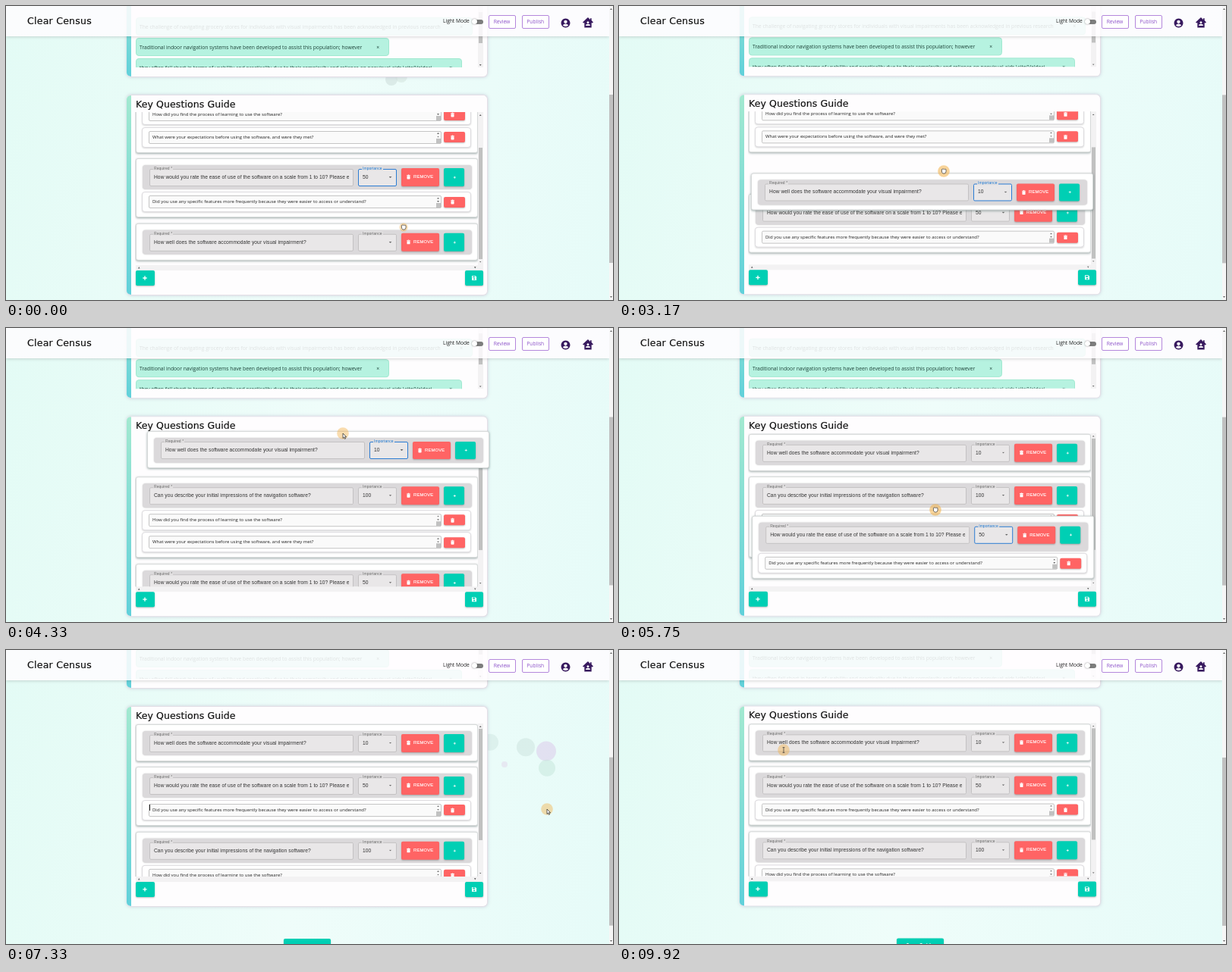
These frames come from a looping animation (800 px wide and 388 px high, 10000 ms). An HTML page:

```html
<!DOCTYPE html>
<html lang="en">
<head>
<meta charset="utf-8">
<title>Key Questions Guide</title>
<style>
html, body { margin: 0; width: 100%; height: 100%; overflow: hidden; }
#stage { position: relative; width: 800px; height: 388px; overflow: hidden;
  background: linear-gradient(100deg, #e3fbf5, #effdfa 50%, #e6fbf8);
  font: 6.67px/1 "Open Sans", "Noto Sans", sans-serif; color: #222; }
#stage div { position: absolute; box-sizing: border-box; white-space: pre; }
#stage svg { position: absolute; overflow: visible; }
.title { font: 12.5px/16px "DejaVu Sans", sans-serif; letter-spacing: .1px; color: #111; -webkit-text-stroke: .2px #111; }
.panel { background: #fefdfe; border: 1px solid #e3dee6; border-left: 0; border-radius: 6px; overflow: hidden;
  box-shadow: 0 0 4px rgba(150, 130, 170, .35); }
.stripe { background: linear-gradient(#a3e9d0, #5fd0da); }
.clip { overflow: hidden; }
.chip { background: #b6f2e0; border: 1px solid #a0e8d0; border-radius: 4px; font-size: 6.74px; line-height: 23.3px; padding-left: 4px; color: #1d4238; }
.chip i { position: absolute; right: 12px; font-style: normal; }
.card { background: #fff; border: 1px solid #d6d9d9; border-radius: 3px; box-shadow: 0 1px 3px rgba(60, 90, 85, .5); }
.row { background: #dbd9db; border-radius: 4px; box-shadow: 0 0 2px rgba(0, 0, 0, .2); }
.field { background: #e9e7e8; border: 1px solid #c4c2c3; border-radius: 2px; overflow: hidden;
  font: 6.67px/20px "Liberation Sans", Arial, sans-serif; letter-spacing: .0625px; color: #333; }
.field span { position: absolute; left: 5px; right: 5px; overflow: hidden; }
.label { background: #e2e0e1; padding: 0 1px; font: 5px/5px "Liberation Sans", Arial, sans-serif; letter-spacing: .05px; color: #666; }
.focus .select { border-color: #2b7cd3; }
.focus .imp { color: #1976d2; }
.red, .teal { border-radius: 2px; color: #fff; box-shadow: 0 1px 2px rgba(0, 0, 0, .25); }
.red { background: #ff6464; font: 500 5.83px/23px "Liberation Sans", Arial, sans-serif; letter-spacing: .17px; -webkit-text-stroke: .15px #fff; }
.teal { background: #00cfb4; text-align: center; }
.sub { background: #fff; border: 1px solid #dcdade; border-radius: 4px; box-shadow: 0 1px 2px rgba(0, 0, 0, .15); }
.area { background: #fafafa; border: 1px solid #c4c4c4; border-radius: 2px; padding-left: 4px; font-size: 6px; line-height: 15px; }
.up, .down { background: #666; }
.up { clip-path: polygon(50% 0, 100% 100%, 0 100%); }
.down { clip-path: polygon(0 0, 100% 0, 50% 100%); }
.track { background: #f3f2f3; }
.thumb { background: #c1c1c1; }
.head { background: rgba(255, 253, 255, .86); box-shadow: 0 1px 4px rgba(0, 0, 0, .16); }
.outline { border: 1px solid #b487dc; border-radius: 2px; color: #8b50c8; text-align: center; line-height: 16px; background: #fff; }
</style>
</head>
<body>
<div id="stage"></div>
<script>
const LOOP = 10000, SINGLE = 56.1, PAIR = 85.8, TRIPLE = 115, LIST_Y = 140.5, MAX_SCROLL = 54.6;
const LIFT_GAP = 5; // a lifted card keeps extra room above its follow-ups

const box = (cls, x, y, w, h, html = '', id = '') =>
  `<div class="${cls}" id="${id}" style="left:${x}px;top:${y}px;width:${w}px;height:${h}px">${html}</div>`;
const text = (cls, x, y, html) => `<div class="${cls}" style="left:${x}px;top:${y}px">${html}</div>`;
const icon = (x, y, size, body, fill = '#fff') =>
  `<svg style="left:${x}px;top:${y}px" width="${size}" height="${size}" viewBox="0 0 24 24" fill="${fill}">${body}</svg>`;

const TRASH = '<path d="M4 4h5l1-2h4l1 2h5v3H4zM5 8h14v12q0 2-2 2H7q-2 0-2-2z"/>';
const PLUS = '<path d="M10 4h4v6h6v4h-6v6h-4v-6H4v-4h6z"/>';
const SAVE = '<path fill-rule="evenodd" d="M3 3h14l4 4v14H3zM6 5v5h10V5zM12 13a3 3 0 1 0 .1 0z"/>';
const USER = '<path fill-rule="evenodd" d="M12 1a11 11 0 1 0 .1 0zM12 5a4 4 0 1 1-.1 0zM5 17q7-6 14 0-7 7-14 0z"/>';
const HOME = '<path fill-rule="evenodd" d="M12 0L0 11l2 2 2-1v11h16V12l2 1 2-2-4-4V2h-3v3zM12 9a2.5 2.5 0 1 1-.1 0zM7 19q0-4 5-4t5 4z"/>';

const subRow = (label, y) =>
  box('sub', 8, y, 434, 27) +
  box('area', 17, y + 5, 386, 17, label) +
  box('up', 397, y + 7.5, 3, 2) + box('down', 397, y + 12, 3, 2) +
  box('thumb', 395.5, y + 15, 6, 6) +
  box('red', 406, y + 6.5, 27.5, 14) + icon(413.5, y + 10, 7, TRASH);

const card = (id, q, value, subs, gap) => box('card', 0, 0, 451, 49 + 29.4 * subs.length + gap, '', id)
  .replace('</div>', `<div style="left:-1px;top:-1px">` +
    box('row', 9, 9, 433.5, 32.5 + gap) +
    box('field', 18, 14, 269, 23, `<span>${q}</span>`) + text('label', 23, 11, 'Required *') +
    box('field select', 293, 14, 50.5, 23, `<span class="val">${value}</span>`) + text('label imp', 298, 11, 'Importance') +
    box('down', 333.5, 24, 4, 2.2) +
    box('red', 350, 13.5, 50, 23.5, '<span style="margin-left:16px">REMOVE</span>') + icon(356, 21.5, 7, TRASH) +
    box('teal', 406, 13.5, 27, 23.5) + icon(417.5, 23, 4.5, PLUS) +
    subs.map((s, i) => subRow(s, 44.2 + gap + 29.4 * i)).join('') + '</div></div>');

const QUESTIONS = {
  first: ['Can you describe your initial impressions of the navigation software?', '100',
    ['How did you find the process of learning to use the software?',
     'What were your expectations before using the software, and were they met?']],
  rate: ['How would you rate the ease of use of the software on a scale from 1 to 10? Please explain', '50',
    ['Did you use any specific features more frequently because they were easier to access or understand?']],
  well: ['How well does the software accommodate your visual impairment?', '10', []]
};
const make = key => card(key, ...QUESTIONS[key], 0);
const makeLifted = key => card('up-' + key, ...QUESTIONS[key], QUESTIONS[key][2].length ? LIFT_GAP : 0);
const chip = (y, w, label) => box('chip', 0, y, w, 24.5, `${label}<i>×</i>`);

const upper = box('panel', 158.5, -60, 476.5, 153.7, box('stripe', 0, -1, 6.5, 155)) +
  box('clip', 171, -50, 451, 131,
    chip(64.5, 444, 'The challenge of navigating grocery stores for individuals with visual impairments has been acknowledged in previous research') +
    chip(91.7, 334, 'Traditional indoor navigation systems have been developed to assist this population; however') +
    chip(118.5, 430, 'they often fall short in terms of usability and practicality due to their complexity and reliance on nonvisual aids \\cite{Valdori')) +
  box('track', 622, -40, 6.5, 121) + box('thumb', 622.5, 8, 5.5, 40.5) + box('down', 623.7, 77, 3, 2);

const guide = box('panel', 158.5, 116.5, 476.5, 265.5, box('stripe', 0, -1, 6.5, 266)) +
  text('title', 171, 121.5, 'Key Questions Guide') +
  box('track', 622, 140, 6.5, 202) + box('up', 623.7, 143, 3, 2) + box('down', 623.7, 336.5, 3, 2) +
  box('thumb', 622.5, 147, 5.5, 147, '', 'thumb') +
  box('track', 171, 342, 457.5, 6.5) +
  box('up', 174, 344, 2.5, 2.5) + box('down', 617, 344, 2.5, 2.5) +
  box('clip', 170, 140, 452, 202, `<div id="list" style="left:1px">${make('first') + make('rate') + make('well')}</div>`) +
  box('teal', 171, 349.4, 24.5, 20) + icon(179.3, 355.4, 8, PLUS) +
  box('teal', 604.5, 349.4, 24.5, 20) + icon(613, 355.4, 8, SAVE) +
  box('teal', 365.5, 423.5, 62.5, 20, '<b style="line-height:20px">Save Guide</b>') +
  box('', 188.5, 247, .8, 7.5, '', 'caret');

const header = box('head', 0, 0, 795, 40) +
  `<div class="title" style="left:28px;top:11.5px;letter-spacing:.25px">Clear Census</div>` +
  text('', 576, 17.3, 'Light Mode') +
  box('', 616, 17.5, 13, 6, '', 'switch') + box('', 613.5, 16.7, 7.5, 7.5, '', 'knob') +
  box('outline', 635.5, 11.5, 36, 18, 'Review') + box('outline', 679.5, 11.5, 36.5, 18, 'Publish') +
  icon(730.5, 15.5, 13, USER, '#37195e') + icon(760, 15, 14, HOME, '#37195e');

const bar = box('', 794.5, 0, 5.5, 388, '', 'bar') + box('thumb', 795, 117, 5, 222, '', 'pageThumb') +
  box('up', 796, 3, 3, 2) + box('down', 796, 383, 3, 2);

const pointer = `<svg id="pointer" width="1" height="1">
  <circle id="halo" r="7.8" fill="#f3b145"/>
  <path id="hand" d="M-2.6-1v-1.4q1-1 1.6 0 .8-1.3 1.5 0 .8-1 1.5 0 .9-.6 1 .4V.6Q2.6 3 1 3h-2Q-3 2-2.6-1z" fill="#fff" stroke="#333" stroke-width=".7"/>
  <path id="arrow" d="M0 0v6.4l1.5-1.3 1 2.3 1.1-.5-1-2.2h2z" fill="#fff" stroke="#222" stroke-width=".7"/>
  <path id="beam" d="M-1.4-3.4h2.8M0-3.4v6.8M-1.4 3.4h2.8" stroke="#333" stroke-width=".7"/></svg>`;

// x, y, radius, colour, start, end
const BUBBLES = [
  [508, 97, 8, '#cfe0dc', -900, 900], [521, 93, 8, '#d6e6e0', -900, 900],
  [492, 98, 8, '#f3c4dc', 700, 2200], [486, 113, 6, '#d9ead9', 700, 2000],
  [638, 122, 11, '#d3e9e4', 6500, 8000], [657, 151, 4, '#e3dcec', 6550, 8100],
  [685, 128, 12, '#cfe6e0', 6600, 8300], [712, 133, 13, '#dcc8ea', 6700, 8500],
  [713, 155, 11, '#c6e6da', 6700, 8600]
];

document.getElementById('stage').innerHTML =
  `<svg id="bubbles" width="800" height="388">${BUBBLES.map(b => `<circle r="${b[2]}" fill="${b[3]}"/>`).join('')}</svg>` +
  `<div id="page">${upper + guide}</div>` + makeLifted('rate') + makeLifted('well') + header + bar + pointer;

const $ = id => document.getElementById(id);
const css = (id, props) => Object.assign($(id).style, props);
css('switch', { background: '#7d7d7d', borderRadius: '3px' });
css('knob', { background: '#fff', borderRadius: '50%', boxShadow: '0 0 2px rgba(0,0,0,.5)' });
css('bar', { background: '#f6f6f6' });
css('caret', { background: '#222' });

const clamp = v => Math.max(0, Math.min(1, v));
const smooth = v => (v = clamp(v), v * v * (3 - 2 * v));
const slide = (t, start) => 1 - (1 - clamp((t - start) / 200)) ** 3;

// smooth path through [time, x, y] keys, without overshoot
function along(keys, t) {
  const n = keys.length - 1;
  if (t <= keys[0][0]) return keys[0].slice(1);
  if (t >= keys[n][0]) return keys[n].slice(1);
  const i = keys.findIndex((k, j) => keys[j + 1][0] > t);
  const slope = (j, c) => {
    if (j === 0 || j === n) return 0;
    const [a, b, d] = [keys[j - 1], keys[j], keys[j + 1]];
    return (b[c] - a[c]) * (d[c] - b[c]) <= 0 ? 0 : (d[c] - a[c]) / (d[0] - a[0]);
  };
  const p = keys[i], q = keys[i + 1], span = q[0] - p[0], u = (t - p[0]) / span;
  return [1, 2].map(c => {
    const m0 = slope(i, c) * span, m1 = slope(i + 1, c) * span;
    return p[c] + u * (m0 + u * (3 * (q[c] - p[c]) - 2 * m0 - m1 + u * (2 * (p[c] - q[c]) + m0 + m1)));
  });
}

const CURSOR = [[0, 524, 292], [500, 490, 312], [1300, 490, 322], [1700, 490, 322], [2300, 425, 289], [2550, 425, 288],
  [3170, 428, 218], [3700, 435, 165], [4330, 444, 139], [4600, 444, 139], [5350, 413, 308], [5480, 413, 307],
  [5750, 417, 240], [6000, 418, 206], [6250, 416, 193], [6500, 440, 196], [7250, 713, 210], [8000, 713, 210],
  [8700, 722, 206], [9000, 715, 205], [9850, 217, 132]];
const LIFT_WELL = [[2550, 171, 286.2], [3170, 174, 220.6], [3700, 180, 165], [4330, 186, 136], [4650, 171, 139.6]];
const LIFT_RATE = [[5480, 171, 310.4], [5750, 175.2, 248], [6000, 176, 212], [6250, 174, 198], [6550, 171, 195.3]];

function lift(key, keys, t) {
  const held = t >= keys[0][0] && t < keys[keys.length - 1][0];
  const [x, y] = along(keys, t);
  css('up-' + key, { visibility: held ? 'visible' : 'hidden', transform: `translate(${x}px,${y}px)` });
  $(key).style.visibility = held ? 'hidden' : 'visible';
}

function draw(t) {
  const pageY = -t * .0002 - 41.6 * smooth((t - 6560) / 450);
  const scroll = MAX_SCROLL * (1 - smooth((t - 3400) / 700));
  css('page', { transform: `translateY(${pageY}px)` });
  css('pageThumb', { transform: `translateY(${-pageY * .572}px)` });
  css('thumb', { transform: `translateY(${scroll * .733}px)` });
  css('list', { top: LIST_Y - 140 - scroll + 'px' });

  const place = (key, y) => css(key, { transform: `translateY(${y}px)` });
  place('first', SINGLE * slide(t, 3700) + PAIR * slide(t, 5850));
  place('rate', t < 5480 ? TRIPLE + SINGLE * slide(t, 3079) : SINGLE);
  place('well', t < 2550 ? TRIPLE + PAIR : 0);
  lift('well', LIFT_WELL, t);
  lift('rate', LIFT_RATE, t);

  const focus = t < 500 ? 'rate' : t < 5480 ? 'well' : t < 6600 ? 'rate' : '';
  for (const key of ['rate', 'well'])
    for (const id of [key, 'up-' + key]) $(id).classList.toggle('focus', key === focus);
  // the first choice loses its highlight once the card is dropped
  if (t > 4650 && t < 5480) $('well').classList.remove('focus');
  $('well').querySelector('.val').textContent = t < 1250 ? '' : '10';
  css('caret', { opacity: t > 7250 && t < 7750 ? 1 : 0 });

  const [x, y] = along(CURSOR, t);
  css('pointer', { left: x + 'px', top: y + 'px' });
  const mode = t < 4300 || (t > 5300 && t < 6250) ? 'hand' : t < 9500 ? 'arrow' : 'beam';
  for (const id of ['hand', 'arrow', 'beam']) css(id, { display: id === mode ? 'inline' : 'none' });
  const pressed = (t > 2450 && t < 4300) || (t > 5480 && t < 6250);
  $('halo').setAttribute('r', 5.5 + 2.3 * smooth(t / 400));
  $('halo').setAttribute('opacity', pressed ? .55 : .43);

  [...$('bubbles').children].forEach((c, i) => {
    const [bx, by, , , start, end] = BUBBLES[i], p = clamp((t - start) / (end - start));
    c.setAttribute('cx', bx);
    c.setAttribute('cy', by + 4 * (.5 - p));
    c.setAttribute('opacity', .6 * Math.sin(Math.PI * p));
  });
}

const begin = performance.now();
function tick() {
  draw((performance.now() - begin) % LOOP);
  requestAnimationFrame(tick);
}
tick();
</script>
</body>
</html>
```
